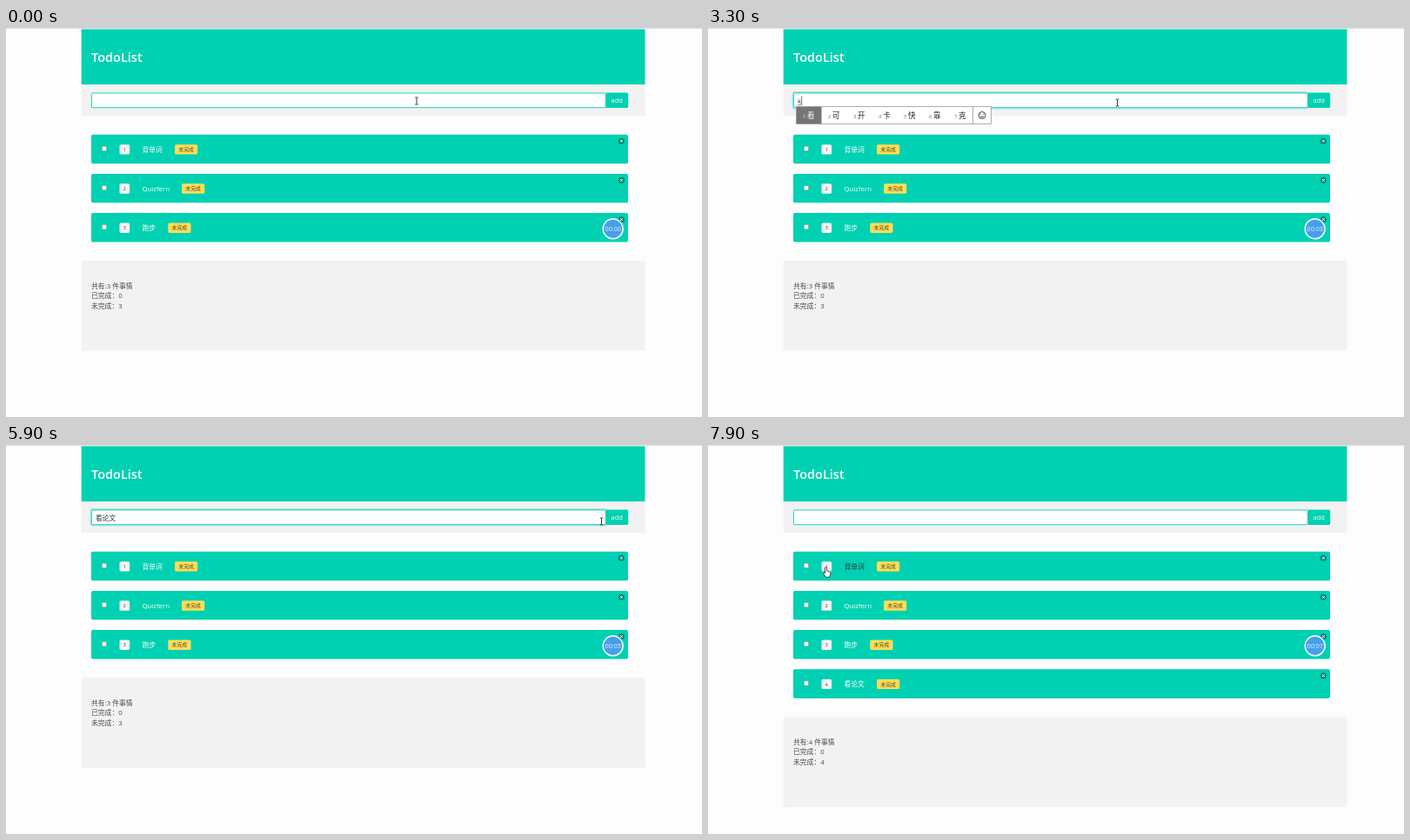
An HTML page for the animation above (8 s loop, 800 by 448 pixels).

```html
<!DOCTYPE html>
<html lang="zh-CN">
<head>
<meta charset="utf-8">
<title>TodoList</title>
<style>
  html, body { margin: 0; width: 800px; height: 448px; overflow: hidden; background: #fdfdfd; }
  svg { display: block; font-family: "Open Sans", "Noto Sans CJK SC", "Noto Sans CJK", sans-serif; }
  text { white-space: pre; }
</style>
</head>
<body>
<svg id="stage" width="800" height="448" viewBox="0 0 800 448"></svg>
<script>
const LOOP = 8000, STEP = 100, ADD_AT = 6200, FOCUS_AT = 1800;
const TEAL = '#00d1b2', INK = '#4a4a4a', ROW = 45.15;
const stage = document.getElementById('stage');
const pen = document.createElement('canvas').getContext('2d');

// x of the status tag depends on the width of the title
const todos = [['背单词', 194], ['Quizfern', 202], ['跑步', 186.3], ['看论文', 194]];

// time, committed text, text being composed, candidates
const typing = [
  [FOCUS_AT, '', ''],
  [2100, '', 's', '是 说 上 三 时 四 十'],
  [2300, '', ''],
  [3200, '', 'k', '看 可 开 卡 快 靠 克'],
  [4000, '看', ''],
  [4300, '看', 'l', '了 来 里 老 路 两 楼'],
  [4600, '看', 'lw', '论文 礼物 了 来 里 老 路'],
  [4900, '看论文', ''],
  [5100, '看论文', '']
];

// time, x, y of the pointer
const path = [
  [0, 472, 84], [1000, 472, 84], [1300, 470.5, 86], [5200, 470.5, 86], [5900, 684.5, 88],
  [6100, 707.5, 85], [6900, 707.5, 85], [7700, 190, 174], [7900, 135.5, 141], [LOOP, 135.5, 141]
];
const seconds = [1000, 2100, 3100, 4000, 5100, 6000, 6900];

const rect = (x, y, w, h, fill, extra = '') =>
  `<rect x="${x}" y="${y}" width="${w}" height="${h}" fill="${fill}" ${extra}/>`;
const text = (x, y, size, fill, str, extra = '') =>
  `<text x="${x}" y="${y}" font-size="${size}" fill="${fill}" ${extra}>${str}</text>`;
const line = (d, color, width = 1) =>
  `<path d="${d}" fill="none" stroke="${color}" stroke-width="${width}"/>`;
const middle = 'text-anchor="middle"';

function textWidth(str) {
  pen.font = '7.8px "Open Sans", "Noto Sans CJK SC", "Noto Sans CJK", sans-serif';
  return pen.measureText(str).width;
}

function pointerAt(t) {
  const i = path.findIndex(p => p[0] > t);
  const [a, b] = [path[i - 1], path[i]];
  const k = (t - a[0]) / (b[0] - a[0]);
  return [a[1] + (b[1] - a[1]) * k, a[2] + (b[2] - a[2]) * k];
}

function todo([title, tagX], i, hovered) {
  const y = ROW * i;
  return `<g transform="translate(0 ${y})">` +
    rect(98, 122.8, 617, 33.4, TEAL, 'rx="1.8"') +
    rect(110.3, 136.3, 5.2, 5.2, '#f4f4f4', 'rx=".8" stroke="#8b9c99" stroke-width=".6"') +
    rect(130.5, 134.2, 11.6, 11.4, '#f5f5f5', 'rx="1.6"') +
    text(136.3, 142.2, 5.9, INK, i + 1, middle) +
    text(156.5, 142.6, 7.8, hovered ? '#363636' : '#fff', title) +
    rect(tagX, 134.2, 26.2, 11.4, '#ffdd57', 'rx="1.6"') +
    text(tagX + 13.1, 142.1, 5.9, '#51482a', '未完成', middle) +
    '<circle cx="707.4" cy="130.2" r="3.5" fill="#07816f"/>' +
    line('M706 128.8l2.8 2.8m0-2.8l-2.8 2.8', '#fff', 1) + '</g>';
}

function candidates(x, list) {
  let cells = '', left = 0;
  list.split(' ').forEach((word, i) => {
    const w = 21 + 8 * word.length;
    if (!i) cells += rect(0, 0, w, 20, '#757575');
    cells += text(left + 7.6, 13, 6, i ? '#777' : '#eee', i + 1) +
      text(left + 12.6, 13.4, 8.6, i ? '#222' : '#fff', word, 'font-weight="500"');
    left += w;
  });
  return `<g transform="translate(${x} 90.5)">` +
    rect(0, 0, left + 21, 20, '#fff') + cells +
    line(`M${left} 0v20M0 0h${left + 21}v20H0z`, '#999', .8) +
    `<circle cx="${left + 10.5}" cy="10" r="4" fill="none" stroke="#333" stroke-width=".9"/>` +
    line(`M${left + 8.3} 11q2.2 2.6 4.4 0M${left + 8.7} 8.2v1.2m3.6-1.2v1.2`, '#333', .9) + '</g>';
}

function field(t) {
  const focused = t >= FOCUS_AT && t < ADD_AT;
  let out = focused
    ? rect(97.5, 74, 592, 18.5, 'none', `rx="2" stroke="${TEAL}" stroke-opacity=".3" stroke-width="2"`) : '';
  out += rect(98.4, 74.9, 591, 16.8, '#fff', `rx="1.6" stroke="${TEAL}" stroke-width=".9"`);
  if (!focused) return [out, ''];
  const [since, done, draft, words] = typing.filter(s => s[0] <= t).pop();
  const start = 103 + textWidth(done), end = 103 + textWidth(done + draft);
  out += text(103, 86.5, 7.8, '#363636', done + draft);
  if (draft) out += line(`M${start} 88.7H${end}`, '#555', .7);
  if ((t - since) % 1000 < 500) out += line(`M${end + .6} 78.5V89.2`, '#333', .7);
  return [out, words ? candidates(start - 1.5, words) : ''];
}

function pointer(x, y, kind) {
  const shapes = {
    beam: line('M-1.8-4h1.3l.5.4.5-.4h1.3M0-3.6v7.2M-1.8 4h1.3l.5-.4.5.4h1.3', '#222', .9),
    hand: '<path d="M-1 0q1-1 2 0v4l3 .6q1.4.4 1.3 1.8l-.5 3-1 1.8h-4l-2.6-4q-.6-1.4.6-1.5l1.2 1z" fill="#fff" stroke="#222" stroke-width=".8"/>',
    arrow: '<path d="M0 0v9.4l2.2-2 1.5 3.4 1.5-.7-1.5-3.2h3z" fill="#fff" stroke="#222" stroke-width=".7"/>'
  };
  return `<g transform="translate(${x} ${y})">${shapes[kind]}</g>`;
}

function draw(t) {
  const count = t < ADD_AT ? 3 : 4;
  const [x, y] = pointerAt(t);
  const onBar = y > 74 && y < 93;
  const onButton = onBar && x > 689 && x < 715;
  const onFirst = y > 134 && y < 146 && x > 130 && x < 181;
  const kind = onButton || onFirst ? 'hand' : onBar && x > 98 && x < 690 ? 'beam' : 'arrow';
  const [input, popup] = field(t);
  const clock = seconds.filter(s => s <= t).length;
  const shift = ROW * (count - 3);

  stage.innerHTML =
    rect(0, 0, 800, 1.2, '#e4e4e4') +
    rect(86.7, 1.4, 647.8, 63.8, TEAL) +
    text(98, 39.3, 14.5, '#fff', 'TodoList', 'font-weight="600"') +
    rect(86.7, 65.2, 647.8, 35.8, '#f2f2f2') +
    input +
    rect(689.2, 74.5, 26, 17.5, onButton ? '#00c0a4' : TEAL, 'rx="1.6"') +
    text(702.2, 86.2, 7.4, '#fff', 'add', middle) +
    todos.slice(0, count).map((item, i) => todo(item, i, !i && onFirst)).join('') +
    `<g transform="translate(0 ${shift})">` +
    rect(86.7, 268, 647.8, 103.7, '#f2f2f2') +
    [`共有:${count} 件事情`, '已完成：0', `未完成：${count}`]
      .map((s, i) => text(98, 299.5 + 11.65 * i, 7.8, INK, s)).join('') + '</g>' +
    '<circle cx="697.7" cy="231.3" r="11.4" fill="#479fe9" stroke="#eef6fb" stroke-width="1.6"/>' +
    text(697.7, 234, 7.2, '#e4f2ff', `00:0${clock}`, middle) +
    popup + pointer(x, y, kind);
}

let last = -1;
function tick(now) {
  const t = Math.floor(now % LOOP / STEP) * STEP;
  if (t !== last) draw(last = t);
  requestAnimationFrame(tick);
}
draw(0);
requestAnimationFrame(tick);
</script>
</body>
</html>
```
